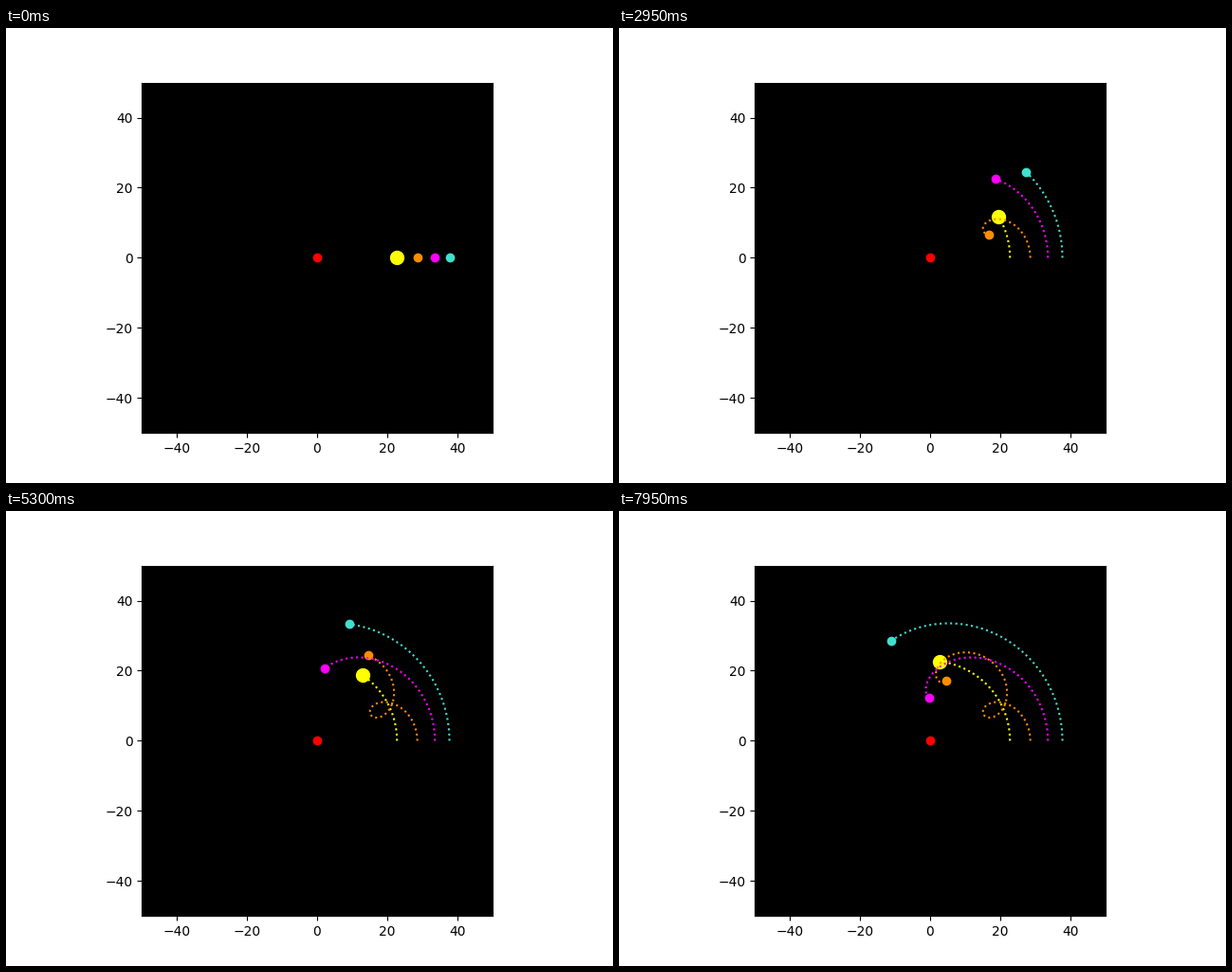
Write a matplotlib script that moves like this. It is 640 by 480 pixels and loops after 8 s.

```python
import numpy as np
import matplotlib.pyplot as plt
from matplotlib.animation import FuncAnimation

FRAMES = 160      # one day per frame
INTERVAL = 50

# Orbit radii in units of ten million km, periods in days
SUN_RADIUS, SUN_PERIOD = 22.79, 687.0
PLANETS = [
    (5.79, 87.97, "darkorange"),
    (10.82, 224.7, "magenta"),
    (14.96, 365.25, "turquoise"),
]


def orbit(radius, period, days):
    angle = 2 * np.pi * days / period
    return np.array([radius * np.cos(angle), radius * np.sin(angle)])


days = np.arange(FRAMES)
sun = orbit(SUN_RADIUS, SUN_PERIOD, days)
paths = [sun] + [sun + orbit(r, p, days) for r, p, _ in PLANETS]
colors = ["yellow"] + [c for _, _, c in PLANETS]
sizes = [10, 6, 6, 6]

fig, ax = plt.subplots(figsize=(6.4, 4.8), dpi=100)
ax.set_facecolor("black")
ax.set_aspect("equal")
ax.set_xlim(-50, 50)
ax.set_ylim(-50, 50)
ax.set_xticks(range(-40, 41, 20))
ax.set_yticks(range(-40, 41, 20))

ax.plot([0], [0], "o", color="red", markersize=6)
bodies, trails = [], []
for color, size in zip(colors, sizes):
    bodies += ax.plot([], [], "o", color=color, markersize=size)
    trails += ax.plot([], [], ":", color=color, linewidth=1.5)


def update(day):
    for path, body, trail in zip(paths, bodies, trails):
        body.set_data(path[0, day:day + 1], path[1, day:day + 1])
        trail.set_data(path[0, :day + 1], path[1, :day + 1])
    return bodies + trails


anim = FuncAnimation(fig, update, frames=FRAMES, interval=INTERVAL,
                     init_func=lambda: update(0), repeat=True,
                     repeat_delay=0, blit=False)
plt.show()
```
